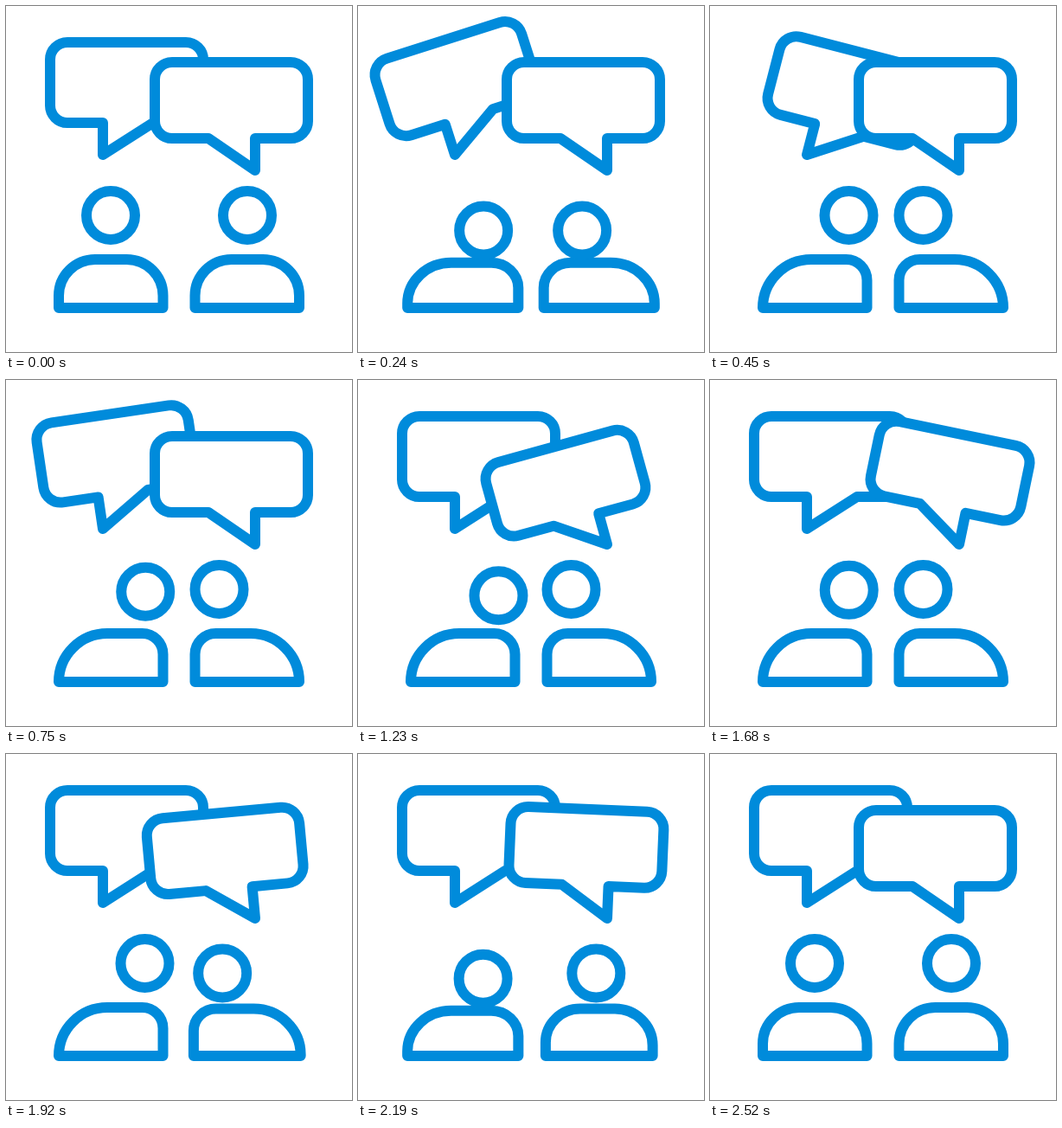
An HTML page that plays this animation: 400 px wide and 400 px high, repeating every 2.55 s.

```html
<!DOCTYPE html>
<html lang="en">
<head>
<meta charset="utf-8">
<title>Conversation</title>
<style>
  html, body { margin: 0; width: 100%; height: 100%; overflow: hidden; background: #fff; }
  svg { display: block; width: 100%; height: 100%; }
</style>
</head>
<body>
<svg viewBox="0 0 400 400" fill="none" stroke="#008bdb" stroke-width="12" stroke-linejoin="round">
  <path id="leftBubble" fill="#fff" d="M71 42H208a20 20 0 0 1 20 20V115a20 20 0 0 1-20 20H170L112 172V135H71a20 20 0 0 1-20-20V62a20 20 0 0 1 20-20z"/>
  <path id="rightBubble" fill="#fff" d="M192 65H329a20 20 0 0 1 20 20V133a20 20 0 0 1-20 20H288V190L234 153H192a20 20 0 0 1-20-20V85a20 20 0 0 1 20-20z"/>
  <path id="leftBody"/>
  <path id="rightBody" transform="matrix(-1 0 0 1 400 0)"/>
  <circle id="leftHead" r="28"/>
  <circle id="rightHead" r="28"/>
</svg>
<script>
const LOOP = 2550, STEP = 30;
const $ = id => document.getElementById(id);
const ease = u => (1 - Math.cos(Math.PI * u)) / 2;
const mix = (a, b, u) => a + (b - a) * u;
const ramp = (t, start, end) => Math.min(1, Math.max(0, (t - start) / (end - start)));

// Keys are [time, value]; every segment eases in and out.
function follow(t, keys) {
  let value = keys[0][1];
  for (let i = 1; i < keys.length; i++) {
    value = mix(value, keys[i][1], ease(ramp(t, keys[i - 1][0], keys[i][0])));
  }
  return value;
}

const leftSwing = [[0, 0], [200, -20.5], [420, 15], [735, -8.5], [960, 3.7], [1170, 0]];
const rightSwing = [[1080, 0], [1300, -20], [1620, 14], [1890, -5.5], [2160, 2.5], [2400, 0]];
const leftNod = [[680, 0], [880, 10], [1090, 3], [1360, 11], [1750, 0]];

function drawPerson(side, t, back, awayX, facingX, nod) {
  const out = ramp(t, 0, 420), home = ramp(t, back, back + 480);
  const turn = ease(out) - ease(home);
  const bounce = Math.sin(Math.PI * out) + Math.sin(Math.PI * home);
  const squash = 4 * bounce * bounce;

  const head = $(side + "Head");
  head.setAttribute("cx", mix(awayX, facingX, turn) + nod * 0.27);
  head.setAttribute("cy", 242 + 18 * bounce + nod);

  const left = 61 - squash, right = 181.5 + squash, top = 293 + squash;
  const outer = mix(42, 56, turn), inner = mix(42, 24, turn);
  const fit = (349 - top) / 56, outerY = outer * fit, innerY = inner * fit;
  $(side + "Body").setAttribute("d",
    `M${left} 349V${top + outerY}A${outer} ${outerY} 0 0 1 ${left + outer} ${top}` +
    `H${right - inner}A${inner} ${innerY} 0 0 1 ${right} ${top + innerY}V349Z`);
}

function draw(now) {
  const t = Math.floor((now % LOOP) / STEP) * STEP;
  $("leftBubble").setAttribute("transform", `rotate(${follow(t, leftSwing)} 112 172)`);
  $("rightBubble").setAttribute("transform", `rotate(${follow(t, rightSwing)} 288 190)`);
  drawPerson("left", t, 1980, 121, 160.5, follow(t, leftNod));
  drawPerson("right", t, 1815, 279, 246.5, 0);
}

const start = performance.now();
function tick() {
  draw(performance.now() - start);
  requestAnimationFrame(tick);
}
tick();
</script>
</body>
</html>
```
